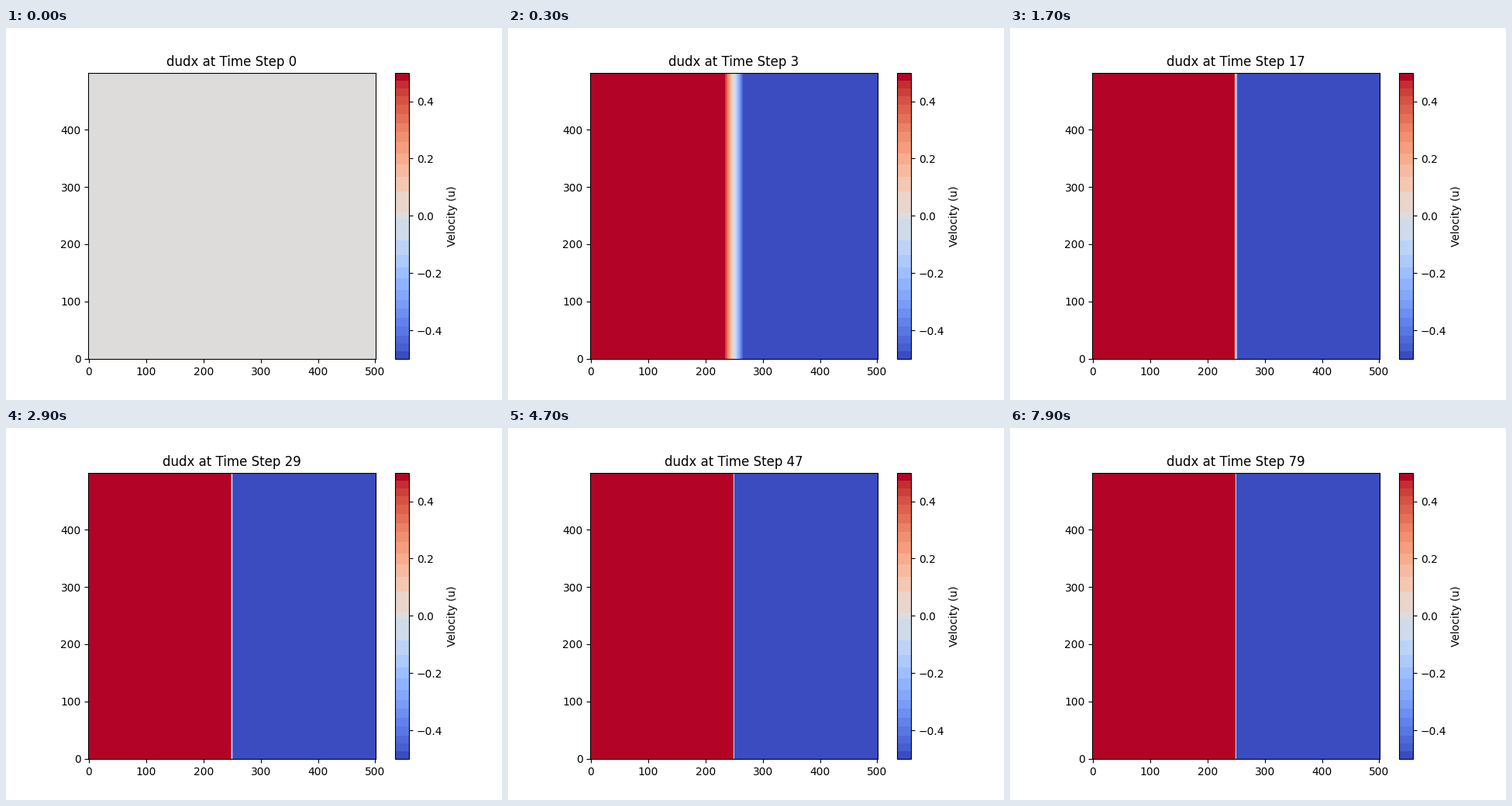
These frames come from a looping animation (640x480 px, 8000 ms). A matplotlib script:

```python
import numpy as np
import matplotlib.pyplot as plt
from matplotlib.animation import FuncAnimation
from matplotlib.colors import ListedColormap

ROWS, COLS = 500, 501
STEPS = 80
RATE = 0.01  # growth of the slope per time step
LIMIT = 0.5


def banded_coolwarm(bands=13, n=256):
    """Coolwarm in steps that get narrower towards both ends."""
    half = LIMIT * np.linspace(0.004, 1, bands + 1) ** 0.7
    edges = np.concatenate([-half[::-1], half]) + LIMIT
    mids = (edges[:-1] + edges[1:]) / 2
    mids[0], mids[-1] = 0, 1
    band = np.digitize((np.arange(n) + 0.5) / n, edges[1:-1])
    return ListedColormap(plt.get_cmap("coolwarm")(mids[band]))


def field(step):
    profile = RATE * step * (COLS // 2 - np.arange(COLS))
    return np.tile(profile, (ROWS, 1))


fig, ax = plt.subplots(figsize=(6.4, 4.8), dpi=100)
image = ax.imshow(field(0), cmap=banded_coolwarm(), origin="lower",
                  vmin=-LIMIT, vmax=LIMIT)
fig.colorbar(image, ax=ax, label="Velocity (u)")
title = ax.set_title("", x=0.4995)


def update(step):
    image.set_data(field(step))
    title.set_text(f"dudx at Time Step {step}")
    return image, title


anim = FuncAnimation(fig, update, frames=STEPS, interval=100, repeat=True)
plt.show()
```
